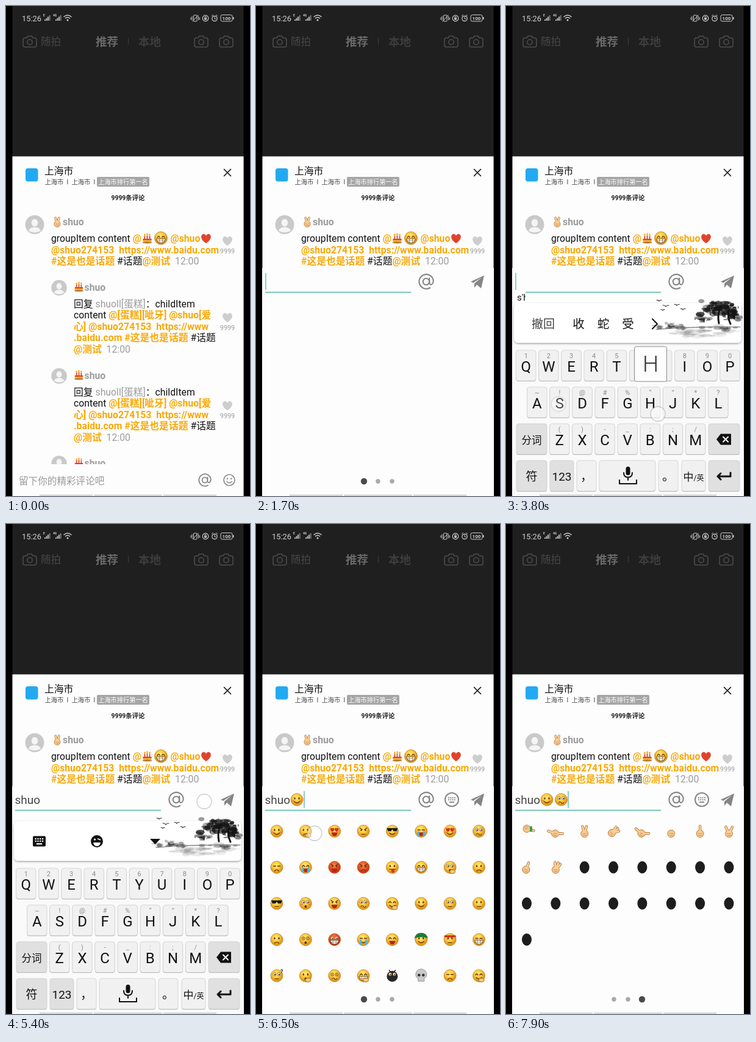
An HTML page that plays this animation: 400x800 px, repeating every 8 s.

```html
<!DOCTYPE html>
<html lang="zh">
<head>
<meta charset="utf-8">
<title>Comment sheet</title>
<style>
html, body { margin: 0; width: 100%; height: 100%; overflow: hidden; background: #000; }
svg { display: block; width: 400px; height: 800px; }
text { font-family: Roboto, "Noto Sans CJK SC", "Noto Sans CJK", sans-serif; white-space: pre; }
.b { font-weight: 700; }
.o { font-weight: 700; fill: #f9a806; }
.g { fill: #9c9c9c; }
.m { text-anchor: middle; }
.line { fill: none; stroke-linecap: round; stroke-linejoin: round; }
</style>
</head>
<body>
<svg viewBox="0 0 400 800">
  <defs>
    <clipPath id="screen"><rect x="10.500" width="379" height="800"/></clipPath>
    <clipPath id="list"><rect x="10" y="320" width="380" height="428"/></clipPath>
    <radialGradient id="yellow" cx=".45" cy=".35"><stop offset="0" stop-color="#ffec80"/><stop offset=".6" stop-color="#fcc93c"/><stop offset="1" stop-color="#e29a1c"/></radialGradient>
    <radialGradient id="red" cx=".45" cy=".35"><stop offset="0" stop-color="#ff8a4a"/><stop offset="1" stop-color="#d5361a"/></radialGradient>
    <filter id="shade" x="-5%" y="-10%" width="110%" height="130%"><feDropShadow dx="0" dy="1.500" stdDeviation="1.500" flood-opacity=".35"/></filter>
  </defs>
  <g id="root" clip-path="url(#screen)"></g>
</svg>
<script>
const LOOP = 8000;
const $ = id => document.getElementById(id);
const times = (n, f) => Array.from({ length: n }, (_, i) => f(i)).join('');
const at = (x, y, body, s = 1) => `<g transform="translate(${x} ${y}) scale(${s})">${body}</g>`;
const group = (id, body) => `<g id="${id}">${body}</g>`;
const text = (x, y, size, body, cls = '', fill = '#111') =>
  `<text x="${x}" y="${y}" font-size="${size}" class="${cls}" fill="${fill}">${body}</text>`;
const rect = (x, y, w, h, fill, r = 0, more = '') =>
  `<rect x="${x}" y="${y}" width="${w}" height="${h}" rx="${r}" fill="${fill}" ${more}/>`;
const dot = (x, y, r, fill, more = '') => `<circle cx="${x}" cy="${y}" r="${r}" fill="${fill}" ${more}/>`;
const oval = (x, y, rx, ry, fill, more = '') => `<ellipse cx="${x}" cy="${y}" rx="${rx}" ry="${ry}" fill="${fill}" ${more}/>`;
const path = (d, fill, more = '') => `<path d="${d}" fill="${fill}" ${more}/>`;
const line = (d, color, w = 1) => `<path class="line" d="${d}" stroke="${color}" stroke-width="${w}"/>`;
const ring = (x, y, r, color, w) => dot(x, y, r, 'none', `stroke="${color}" stroke-width="${w}"`);
const span = (cls, s) => `<tspan class="${cls}">${s}</tspan>`;

let seed = 7;
const rnd = () => (seed = seed * 16807 % 2147483647) / 2147483647;
const spread = n => (rnd() + rnd() - 1) * n;

// ---- emoji, drawn around 0,0 with radius 10
const HEART = 'M0 8C-13-1-8-9-3-8Q-1-8 0-5Q1-8 3-8C8-9 13-1 0 8Z';
const INK = '#5a3208';
const pair = f => f(-3.5) + f(3.5);
const eyes = {
  '.': () => pair(x => oval(x, -2, 1.2, 1.7, INK)),
  'o': () => pair(x => dot(x, -2.5, 2.6, '#fff', `stroke="${INK}" stroke-width=".6"`) + dot(x + .5, -2, 1.2, INK)),
  '-': () => pair(x => line(`M${x - 2}-2h4`, INK, 1.3)),
  '^': () => pair(x => line(`M${x - 2}-1q2-4 4 0`, INK, 1.3)),
  'h': () => pair(x => at(x, -2, path(HEART, '#e02a1c'), .4)),
  'v': () => pair(x => line(`M${x * 1.6}-5L${x * .5}-2.500`, INK, 1.2) + dot(x, -1.5, 1.2, INK)),
  's': () => path('M-9-5H9L7 0H2L0-3L-2 0H-7Z', '#151515'),
  'x': () => pair(x => line(`M${x - 2}-4l4 4m0-4l-4 4`, INK, 1.1)),
  '@': () => pair(x => ring(x, -2, 2.4, INK, .8) + dot(x, -2, .8, INK))
};
const mouths = {
  ')': line('M-4.500 3q4.500 4.500 9 0', INK, 1.2),
  '(': line('M-3.500 6q3.500-4 7 0', INK, 1.2),
  '-': line('M-3 5h6', INK, 1.2),
  '~': line('M-4 5q2-3 4 0t4 0', INK, 1.2),
  'D': path('M-5 2H5Q4 8 0 8T-5 2Z', '#b5261a'),
  'g': path('M-7 1H7Q6 7.500 0 7.500T-7 1Z', '#fff', `stroke="${INK}" stroke-width=".8"`) + line('M-6 4H6M-2.500 1V7M2.500 1V7', INK, .5),
  '0': oval(0, 5, 1.8, 2.2, INK),
  'w': line('M-5 3h10', INK, 1.1) + path('M-2 3H4Q4 9 1 9T-2 3Z', '#e0372a'),
  'x': line('M-4 2l8 6m0-6l-8 6', '#f4efe0', 2)
};
const extras = {
  t: pair(x => rect(x * 1.25 - 1.5, 0, 3, 9, '#4bb4e8', 1.5)),
  b: pair(x => oval(x * 1.8, 2, 2, 1.3, '#f2703c', 'opacity=".7"')),
  G: path('M-11-2Q-9-11 0-11T11-2Q0-6-11-2Z', '#1e7a38'),
  R: rect(-9.5, -7, 19, 3.2, '#d42a22', 1),
  H: oval(4, 7, 4.5, 3.2, '#f8c66b', `stroke="${INK}" stroke-width=".6"`),
  q: text(6, -4, 9, '?', 'b', INK),
  r: ''
};
function face(spec) {
  if (spec === 'K') return dot(0, 1, 9, '#262626') + eyes.o() + line('M-5-9l2 3m8-3l-2 3', '#262626', 1.5);
  if (spec === 'S') return path('M-9-2A9 9 0 0 1 9-2Q9 3 5 4V9H-5V4Q-9 3-9-2Z', '#c9c9c9', 'stroke="#777" stroke-width=".7"') + pair(x => dot(x, -1, 2.3, '#333'));
  const [e, m, ...more] = spec;
  const skin = more.includes('r') ? 'red' : 'yellow';
  return dot(0, 0, 10, `url(#${skin})`, 'stroke="#b9781a" stroke-width=".7"') + eyes[e]() + mouths[m] + more.map(k => extras[k]).join('');
}
// fingers: degrees from upright; lower case n = fist only
function hand(fingers, turn = 0) {
  const limb = (color, w) => fingers.map(a => `<path class="line" d="M0 2V-8" transform="rotate(${a} 0 4)" stroke="${color}" stroke-width="${w}"/>`).join('');
  return `<g transform="rotate(${turn})">${limb('#a8682e', 4.4)}${dot(0, 4, 6, '#f6c78c', 'stroke="#a8682e" stroke-width=".8"')}${limb('#f9cf98', 3)}${line('M-3 4h6M-2 7h5', '#c98b4e', .8)}</g>`;
}
const cake = rect(-8, 0, 16, 6, '#f3b23c', 2) + rect(-8, 0, 16, 2.5, '#d9432a', 1) + oval(0, 7, 9, 1.6, '#b97722') +
  pair(x => rect(x * 1.3 - 1, -5, 2, 5, '#d9432a') + oval(x * 1.3, -7, 1.4, 2.2, '#f7a51c')) + rect(-1, -6, 2, 6, '#d9432a') + oval(0, -8, 1.4, 2.2, '#f7a51c');
const peace = hand([-16, 16]);

const smileIcon = (c, r) => ring(0, 0, r, c, r / 5.5) + pair(x => dot(x * r / 10, -r * .25, r * .14, c)) + line(`M${-r * .45} ${r * .25}Q0 ${r * .8} ${r * .45} ${r * .25}`, c, r / 6.5);
const atIcon = (c, r) => ring(0, 0, r * .42, c, r / 6) + line(`M${r * .42} ${-r * .45}V${r * .15}Q${r * .5} ${r * .5} ${r * .75} ${r * .35}Q${r} ${r * .1} ${r * .92} ${-r * .25}A${r * .94} ${r * .94} 0 1 0 ${r * .5} ${r * .8}`, c, r / 6);
const camera = line('M-8-6h3l2-3h6l2 3h3q3 0 3 3V6q0 3-3 3H-8q-3 0-3-3V-3q0-3 3-3Z', '#4c4c4c', 1.6) + ring(0, 1, 4.2, '#4c4c4c', 1.6);
const keysIcon = c => times(8, i => rect(-6 + i % 4 * 3.3, -4 + (i >> 2) * 3.3, 1.9, 1.9, c)) + rect(-4, 3.2, 8, 1.9, c);

// ---- page behind the input
function topBar() {
  const c = '#cfcfcf';
  const bars = x => times(4, i => rect(x + i * 2.6, 22 - i * 2.3, 1.7, 2 + i * 2.3, i < 3 ? c : '#888'));
  return text(26, 24.5, 12.9, '15:26', '', c) + text(61, 17, 5, 'E', 'b', c) + bars(63) + text(77, 17, 5, '4G', 'b', c) + bars(81) +
    line('M95 17.500q6-5 12 0M97.500 20q3.500-3 7 0', c, 1.5) + dot(101, 23, 1.5, c) +
    rect(307.5, 15, 5.5, 10, 'none', 1, `stroke="${c}"`) + line('M305 17v6m10.500-6v6m2-4v3m-14.500-3v3M306 25L315 15', c) +
    ring(327, 20, 4.8, c, 1.2) + rect(325, 19.5, 4, 3, c) + line('M325.800 19v-1.500h2.400V19', c) +
    ring(342, 20.5, 4.2, c, 1.2) + line('M342 18v3h2M337.500 16l2-1.500m7 1.500l-2-1.500', c) +
    rect(352, 14.5, 19, 10.5, 'none', 2.5, `stroke="${c}"`) + rect(372, 18, 1.5, 4, c) + text(361.5, 22.8, 8, '100', 'b m', c) +
    at(39, 58, camera) + at(320, 58, camera) + at(361, 58, camera) +
    text(57, 64, 16.5, '随拍', '', '#474747') + text(147, 65, 18.5, '推荐', 'b', '#686868') + rect(200, 52, 1, 11, '#3c3c3c') + text(217, 65, 18.5, '本地', 'b', '#3d3d3d');
}
const header = rect(32, 265, 20.5, 21.5, '#23a9f2', 4) + text(63, 274.5, 15.8, '上海市') +
  text(63.5, 291, 10.3, '上海市  I  上海市  I', '', '#444') + rect(149, 279, 86, 16, '#a6a6a6', 2) + text(192, 291, 10.2, '上海市排行第一名', 'm', '#fff') +
  line('M357.500 266.500l11 11m0-11l-11 11', '#111', 1.6) + text(200, 317, 10.4, '9999条评论', 'b m', '#222');

const avatar = (x, y, r) => at(x, y, dot(0, 0, 10, '#c9c9c9') + oval(0, -2, 3.4, 4, '#f5f5f5') + path('M-6.500 6.500Q-5 2.500 0 2.500T6.500 6.500Q0 10-6.500 6.500Z', '#f5f5f5'), r / 10);
const likes = y => at(363, y, path(HEART, '#cdcdcd'), .95) + text(363, y + 20, 10.8, '9999', 'm', '#999');
const rows = (x, y, lines) => lines.map((s, i) => text(x, y + i * 18.6, 15.8, s)).join('');
const user = (x, y, icon) => at(x, y - 5.5, icon, .85) + text(x + 9, y, 15.8, 'shuo', 'b', '#9c9c9c');
const topic = span('o', '#这是也是话题') + ' #话题';
const tail = span('o', '@测试') + span('g', '  12:00');
const comment = avatar(47, 357, 15.5) + user(84, 358, peace) +
  rows(74, 385, ['groupItem content ' + span('o', '@'), span('o', '@shuo274153  https://www.baidu.com'), topic + tail]) +
  at(231.5, 380, cake, .9) + at(254, 379, face('^g'), 1.05) + text(269.5, 385, 15.8, '@shuo', 'o') + at(328, 380, path(HEART, '#e2432c'), .95) + likes(384);
const reply = y => at(0, y, avatar(87, 460, 12.8) + user(119.5, 464.5, cake) + rows(111, 491.5, [
  '回复 ' + span('g', 'shuoll[蛋糕]') + '：childItem',
  'content ' + span('o', '@[蛋糕][呲牙] @shuo[爱'),
  span('o', '心] @shuo274153  https://www'),
  span('o', '.baidu.com ') + topic,
  tail]) + likes(509));
const footer = text(21, 780.5, 15.6, '留下你的精彩评论吧', '', '#999') + at(326, 774, atIcon('#888', 10.5)) + at(366, 774, smileIcon('#888', 9));

// ---- emoji panel
const page1 = '.)b .(H hD vv- s) -Dt h)b o~x -( ^Dt vDr v(r .w ^g o0H .( s- o0b xD o~ ^)H .)b o- .- .( @0 ogr -)t ^D .)G v-R -g o-q .0H @~ ^gH K S -( ^)H'
  .replace('vv-', 'v-').replace('xD', 'vD').split(' ').map(face);
const page2 = Array.from({ length: 40 }, (_, i) => i % 5 === 2 ? path(HEART, '#e2432c') : i % 7 === 3 ? cake : page1[(i * 11 + 5) % 38]);
const penguin = oval(0, 0, 8, 10, '#1d1d1f');
const page3 = [hand([-75], 180) + rect(5, -8, 4, 9, '#3a9a4c', 1), hand([-80, 80], 10), peace, hand([-5, 15, 35], 40), hand([-70, 70], 20), hand([]), hand([0]), hand([-25, 28]), hand([5], 15), hand([-5, 22, 42])]
  .concat(Array(15).fill(penguin));
const grid = (icons, x) => icons.map((s, i) => at(x + 34 + i % 8 * 47.35, 501.5 + (i >> 3) * 59, s)).join('');
const panel = group('pages', grid(page1, 0) + grid(page2, 379) + grid(page3, 758)) +
  times(3, i => dot(177 + i * 23, 776, 3.7, '#a9a9a9')) + group('page', dot(177, 776, 5.2, '#4b4b4b'));

// ---- keyboard
const key = (x, y, w, label, hint = '', fill = '#f1f1f1', size = 24) =>
  rect(x, y + 1, w, 50, '#b4b4b4', 4) + rect(x, y, w, 50, fill, 4, 'stroke="#cfcfcf" stroke-width=".8"') +
  (hint && text(x + w / 2, y + 13, 11, hint, 'm', '#8a8a8a')) + text(x + w / 2, y + (hint ? 34.5 : 33), size, label, 'm');
const keyRow = (x, y, letters, hints) => [...letters].map((c, i) => key(x + i * 37.15, y, 32.5, c, hints[i])).join('');
const DARK = '#e0e0e0';
const letterKeys = keyRow(16.5, 562, 'QWERTYUIOP', '1234567890') + keyRow(34.5, 622, 'ASDFGHJKL', '~!@#%“”*?') + keyRow(71.5, 682, 'ZXCVBNM', '()-_:;/');
const otherKeys = key(17, 682, 50, '分词', '', DARK, 16.5) + key(332, 682, 51, '', '', DARK) + key(17, 742, 50, '符', '', DARK, 19) +
  key(72, 742, 39, '123', '', DARK, 19) + key(116, 742, 32, '，', '', '#f1f1f1', 20) + key(153, 742, 92, '') + key(250, 742, 32, '。', '', '#f1f1f1', 20) +
  key(288, 742, 39, '中<tspan font-size="12">/英</tspan>', '', '#f1f1f1', 17) + key(332, 742, 51, '', '', DARK) +
  path('M345 707.500l7-9h17v18h-17Z', '#111') + line('M356 703.500l8 8m0-8l-8 8', '#fff', 2) +
  line('M368 762v6H347m5-5l-5 5l5 5', '#111', 3) +
  rect(196.5, 752, 7, 14, '#111', 3.5) + line('M193 762q0 7.500 7 7.500t7-7.500M200 770v4', '#111', 2) + line('M186 774v6h28v-6', '#111', 2);

function landscape() {
  const blobs = (n, x, y, w, h, size, alpha, flat = .6) => times(n, () =>
    oval((x + spread(w)).toFixed(1), (y + spread(h)).toFixed(1), (1 + rnd() * size).toFixed(1), (.6 + rnd() * size * flat).toFixed(1), '#151515', `opacity="${(alpha * (.4 + rnd() * .6)).toFixed(2)}"`));
  const bird = (x, y, s) => line(`M${x - s} ${y - s / 2}q${s * .8} 0 ${s} ${s / 2}q${s * .3}-${s * .6} ${s}-${s * .4}`, '#333', 1.1);
  return blobs(26, 318, 534, 64, 12, 16, .12, .25) + blobs(24, 268, 523, 30, 7, 5, .4) + blobs(14, 352, 526, 34, 5, 9, .4, .25) +
    blobs(70, 347, 494, 30, 14, 7, .8) + blobs(40, 372, 500, 14, 17, 5, .85) + blobs(22, 322, 510, 14, 10, 4, .7) +
    line('M352 490q-6 14-3 28M366 495q-4 12 2 24', '#111', 3) + line('M246 528q60-5 138-4', '#555', 1) +
    bird(251, 482, 4) + bird(262, 491, 5) + bird(280, 489, 4) + bird(290, 496, 4) + bird(257, 497, 3);
}
const tools = rect(44, 509.5, 21, 17, '#111', 2) + at(54.5, 517.5, keysIcon('#fff'), 1.15) + dot(149, 518, 10, '#111') +
  dot(145.5, 515, 1.6, '#fff') + line('M150.500 514l4 1.500', '#fff', 1.6) + path('M143 520h12q-1 6-6 6t-6-6Z', '#fff') + path('M236 514h17l-8.500 9Z', '#111');
const stages = [['s', '是三所', 3450], ['s\'h', '收蛇受', 3700], ['shu', '书数输', 3950], ['shuo', '说硕朔', 4150], ['', '', 4400]];
const options = stages.slice(0, 4).map(([, s], i) => group('options' + i, text(61, 526, 19, '撤回', 'm', '#444') +
  [...s].map((c, n) => text(119 + n * 40.5, 526, 19.5, c, 'm')).join('') + line('M240 511l8 8l-8 8', '#111', 2))).join('');
const keyboard = rect(10, 484, 380, 316, '#fafafa') + rect(13, 485, 373, 65, '#fff', 7, 'filter="url(#shade)"') + landscape() +
  group('tools', tools) + options + letterKeys + otherKeys;

const composing = stages.slice(0, 4).map(([s], i) =>
  group('typed' + i, `<svg x="10" y="466" width="${[16, 22, 36, 46][i]}" height="19">${rect(0, 0, 60, 19, '#fff')}${text(8, 15, 15, s)}</svg>`)).join('');
const presses = [['S', 88, 622, 3400, 3650], ['H', 237, 622, 3700, 3880], ['U', 256, 562, 3900, 4060], ['O', 330, 562, 4100, 4260]];
const popups = presses.map(([c, x, y], i) => group('key' + i,
  rect(x - 26.5, y - 66, 53, 57, '#fdfdfd', 3, 'stroke="#8a8a8a"') + text(x, y - 25, 37, c, 'm', '#333" font-weight="300'))).join('');

// [x, y, start, end, travel]
const touches = [[110, 775, 200, 700], [86, 650, 3400, 3950], [249, 666, 3680, 4050], [257, 590, 3900, 4250], [331, 590, 4100, 4450], [357, 766, 4250, 4800],
  [325, 453, 5300, 5750], [36, 503, 6200, 6500], [96, 505, 6420, 6800], [330, 620, 6850, 7200, -210], [330, 625, 7350, 7650, -210]];
const rings = touches.map(([x, y], i) => group('touch' + i, dot(x, y, 12, '#fff', 'fill-opacity=".45" stroke="#999" stroke-opacity=".5" stroke-width="1.300"'))).join('');

const entry = rect(10, 428, 380, 372, '#fdfdfd') + rect(15, 466.5, 239, 2, '#74c5b8') +
  group('word', text(14.5, 457, 19, 'shuo', '', '#444')) + group('emo1', at(67, 450, face('.)b'))) + group('emo2', at(90.5, 450, face('o~'))) +
  group('caret', group('blink', rect(15, 436, 2, 27.5, '#8ccdc4'))) +
  at(279, 450, atIcon('#858585', 12.5)) + group('smile', at(321, 450, smileIcon('#858585', 11))) +
  group('keys', at(321, 450, ring(0, 0, 11, '#858585', 2) + keysIcon('#858585'))) + path('M352 450L374 440L369 461L362 455L358 460V453L370 443L356 452Z', '#858585');

$('root').innerHTML = rect(10, 0, 380, 800, '#1f1f1f') + topBar() + rect(10, 245.5, 380, 555, '#fdfdfd') + header +
  `<g clip-path="url(#list)">${comment + reply(0) + reply(144) + reply(287)}</g>` + footer +
  group('entry', entry + panel + group('keyboard', keyboard) + composing) + popups + rings +
  rect(55, 797.5, 87, 3, '#d6d6d6') + rect(144, 797.5, 112, 3, '#d6d6d6') + rect(258, 797.5, 87, 3, '#d6d6d6');

// ---- motion
function play(id, prop, frames, easing = 'steps(1)') {
  const list = [[0, frames[0][1]], ...frames, [LOOP, frames.at(-1)[1]]];
  $(id).animate(list.map(([t, v]) => ({ offset: t / LOOP, [prop]: v, easing })), { duration: LOOP, iterations: Infinity });
}
const show = (id, ...flips) => play(id, 'opacity', [[0, 0], ...flips.map((t, i) => [t, 1 - i % 2])]);
const move = (id, axis, frames, easing) => play(id, 'transform', frames.map(([t, v]) => [t, `translate${axis}(${v}px)`]), easing);

move('entry', 'Y', [[1100, 374], [1500, 0]], 'ease-out');
move('keyboard', 'Y', [[2000, 325], [2400, 0], [5550, 0], [5900, 325]], 'ease-out');
move('pages', 'X', [[6900, 0], [7300, -379], [7430, -379], [7850, -758]], 'ease-in-out');
move('page', 'X', [[0, 0], [7200, 23], [7700, 46]]);
move('caret', 'X', [[0, 0], [4400, 41], [6300, 63], [6600, 86]]);
show('pages', 5550);
show('blink', 1100, 2100, 2600, 3100, 3500, 4800, 5500, 6000, 6300, 7100, 7600);
show('word', 4400);
show('emo1', 6300);
show('emo2', 6600);
show('smile', 0, 5550);
show('keys', 5550);
show('tools', 0, stages[0][2], stages[4][2]);
stages.slice(0, 4).forEach(([, , t], i) => ['options', 'typed'].forEach(k => show(k + i, t, stages[i + 1][2])));
presses.forEach(([, , , a, b], i) => show('key' + i, a, b));
touches.forEach(([, , a, b, dx], i) => {
  play('touch' + i, 'opacity', [[a - 1, 0], [a, 1], [(a + b) / 2, 1], [b, 0]], 'linear');
  if (dx) move('touch' + i, 'X', [[a, 0], [b, dx]], 'ease-out');
});
</script>
</body>
</html>
```
